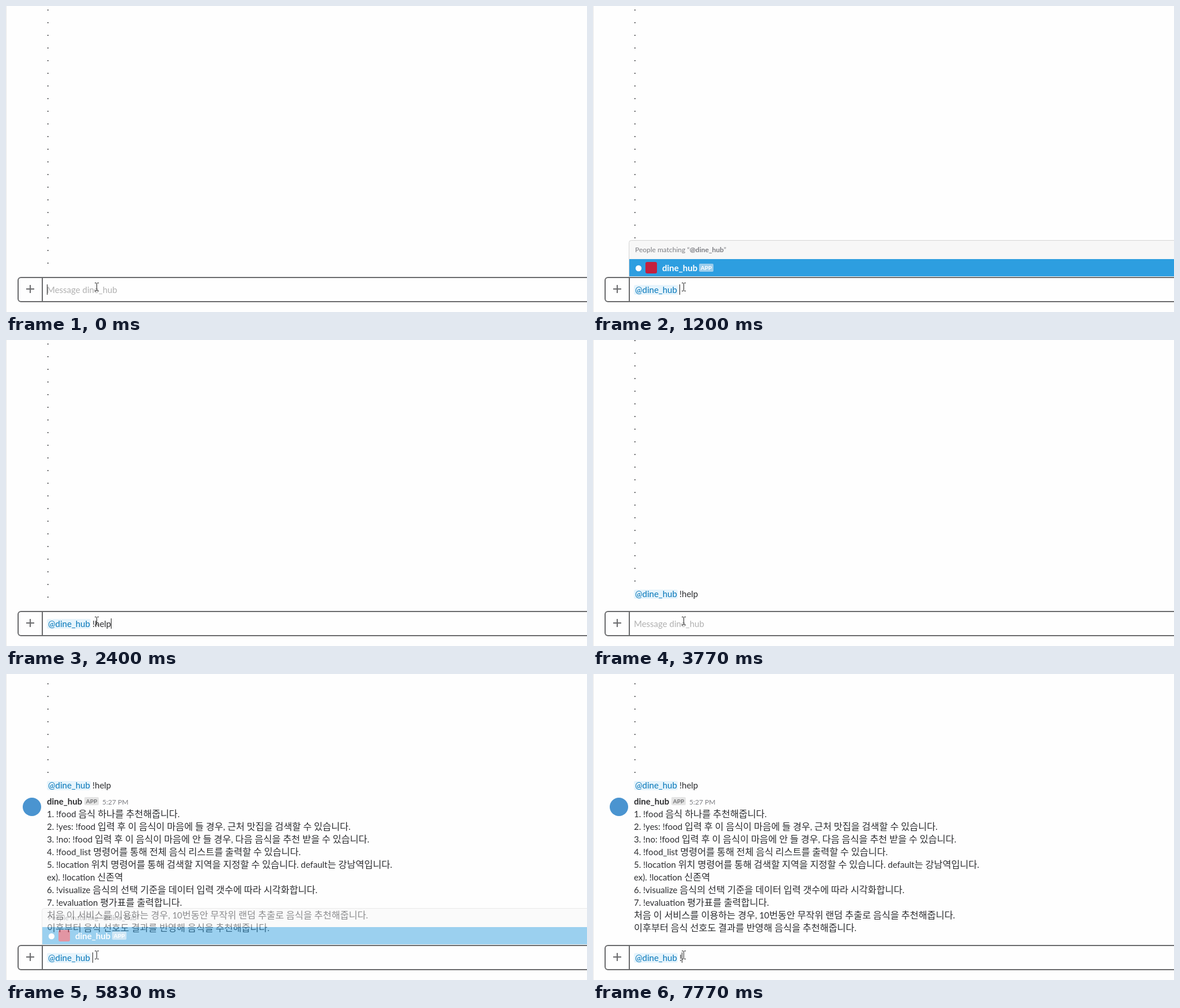
An HTML page for the animation above (8000 ms loop, 1008 by 532 pixels).

```html
<!DOCTYPE html>
<html lang="ko">
<head>
<meta charset="utf-8">
<title>Chat bot help</title>
<style>
  html, body { margin: 0; width: 100%; height: 100%; overflow: hidden; background: #fefefe; }
  svg { display: block; width: 1008px; height: 532px; }
  text { font: 15px Lato, "Noto Sans CJK KR", "Noto Sans CJK", sans-serif; fill: #2c2d30; white-space: pre; }
  .ko { font-size: 16.3px; }
  .bold { font-weight: 700; }
  .small { font-size: 12px; fill: #7c7d82; }
  .badge { font-size: 10px; font-weight: 700; fill: #717274; }
  .mention { fill: #0576b9; }
  .chip { fill: #e6f4fc; }
  .white { fill: #fff; }
  .hint { fill: #b0b0b0; }
  .frame { fill: none; stroke: #6a6b6d; stroke-width: 2; }
  .beam { fill: none; stroke: #222; }
</style>
</head>
<body>
<svg viewBox="0 0 1008 532">
  <rect width="1008" height="532" fill="#fefefe"/>
  <rect width="1" height="532" fill="#e8e8e8"/>
  <g id="feed">
    <g id="dots"></g>
    <g id="sent">
      <rect class="chip" x="71" y="186" width="76" height="16" rx="3"/>
      <text class="mention" x="73" y="199">@dine_hub</text>
      <text x="150" y="199">!help</text>
    </g>
    <g id="reply">
      <circle cx="45" cy="231" r="16" fill="#4a94d0"/>
      <text class="bold" x="71" y="227">dine_hub</text>
      <rect x="136" y="214" width="25" height="14" rx="2" fill="#e4e4e4"/>
      <text class="badge" x="148.5" y="225" text-anchor="middle">APP</text>
      <text class="small" x="167" y="227">5:27 PM</text>
      <g id="lines"></g>
    </g>
  </g>

  <g id="popup">
    <path d="M62.5 472V411.5Q62.5 407.5 66.5 407.5H1010V472Z" fill="#f7f7f7" stroke="#d5d5d5"/>
    <text class="small" x="73" y="428">People matching “<tspan class="bold">@dine_hub</tspan>”</text>
    <rect x="63" y="440" width="945" height="30" fill="#2d9ee0"/>
    <circle class="white" cx="79" cy="456" r="5.2"/>
    <rect x="91" y="445" width="20" height="20" rx="3" fill="#c4213f"/>
    <text class="bold white" x="120" y="461">dine_hub</text>
    <rect x="184" y="448" width="25" height="14" rx="2" fill="#9bcdec"/>
    <text class="badge white" x="196.5" y="459" text-anchor="middle">APP</text>
  </g>

  <rect class="frame" x="21" y="472" width="1000" height="42" rx="5" style="fill: #fefefe"/>
  <path class="frame" d="M63 472V514M35 492H49M42 485V499"/>
  <text id="hint" class="hint" x="71" y="499">Message dine_hub</text>
  <g id="name">
    <rect class="chip" x="71" y="485" width="76" height="17" rx="3"/>
    <text class="mention" x="73" y="499">@dine_hub</text>
  </g>
  <text id="command" x="150" y="499"></text>
  <rect id="caret" y="484" width="1" height="18" fill="#222"/>
  <path class="beam" d="M154 481.5H156.5L157.5 482.5L158.5 481.5H161M157.5 482V495M154 495.5H156.5L157.5 494.5L158.5 495.5H161"/>
</svg>
<script>
const LOOP = 8000, ROW = 22, BLINK = 500;
const el = id => document.getElementById(id);
const help = [
  '1. !food 음식 하나를 추천해줍니다.',
  '2. !yes: !food 입력 후 이 음식이 마음에 들 경우, 근처 맛집을 검색할 수 있습니다.',
  '3. !no: !food 입력 후 이 음식이 마음에 안 들 경우, 다음 음식을 추천 받을 수 있습니다.',
  '4. !food_list 명령어를 통해 전체 음식 리스트를 출력할 수 있습니다.',
  '5. !location 위치 명령어를 통해 검색할 지역을 지정할 수 있습니다. default는 강남역입니다.',
  'ex). !location 신존역',
  '6. !visualize 음식의 선택 기준을 데이터 입력 갯수에 따라 시각화합니다.',
  '7. !evaluation 평가표를 출력합니다.',
  '처음 이 서비스를 이용하는 경우, 10번동안 무작위 랜덤 추출로 음식을 추천해줍니다.',
  '이후부터 음식 선호도 결과를 반영해 음식을 추천해줍니다.'
];
const line = (s, y) =>
  `<text x="71" y="${y}">${s.replace(/[가-힣]+/g, '<tspan class="ko">$&</tspan>')}</text>`;

el('lines').innerHTML = help.map((s, i) => line(s, 249 + i * ROW)).join('');
el('dots').innerHTML = Array.from({ length: 21 }, (_, i) => line('.', 172 - i * ROW)).join('');

// Input: [time, name pasted, command]; each entry restarts the caret blink
const typing = [
  [0, false, ''], [200, true, ''],
  [1230, true, '!'], [1930, true, '!h'], [2170, true, '!he'], [2330, true, '!hel'], [2400, true, '!help'],
  [2770, false, ''], [5770, true, ''], [6770, true, '!']
];
typing[7][0] = 2830;
// Popup: [opens, closes]
const popups = [[200, 1230], [5770, 6770]];
// Feed: [time, vertical shift, messages shown]
const feed = [[0, 276, 0], [2830, 248, 1], [3970, 0, 2]];

const at = (steps, t) => steps.filter(s => s[0] <= t).pop();
const show = (id, on) => el(id).setAttribute('visibility', on ? 'visible' : 'hidden');
const ramp = (t, from, length) => Math.min(1, Math.max(0, (t - from) / length));

function draw(t) {
  const [typed, named, command] = at(typing, t);
  const [, shift, messages] = at(feed, t);

  el('feed').setAttribute('transform', `translate(0 ${shift})`);
  show('sent', messages > 0);
  show('reply', messages > 1);

  el('command').textContent = command;
  show('hint', !named);
  show('name', named);

  const opacity = popups.map(([open, close]) => ramp(t, open, 130) - ramp(t, close, 30));
  el('popup').setAttribute('opacity', Math.max(...opacity));

  const x = named ? 150 + (command ? el('command').getComputedTextLength() : 0) : 71;
  el('caret').setAttribute('x', Math.round(x));
  show('caret', Math.floor((t - typed) / BLINK) % 2 === 0);
}

const start = performance.now();
function tick() {
  draw((performance.now() - start) % LOOP);
  requestAnimationFrame(tick);
}
tick();
</script>
</body>
</html>
```
